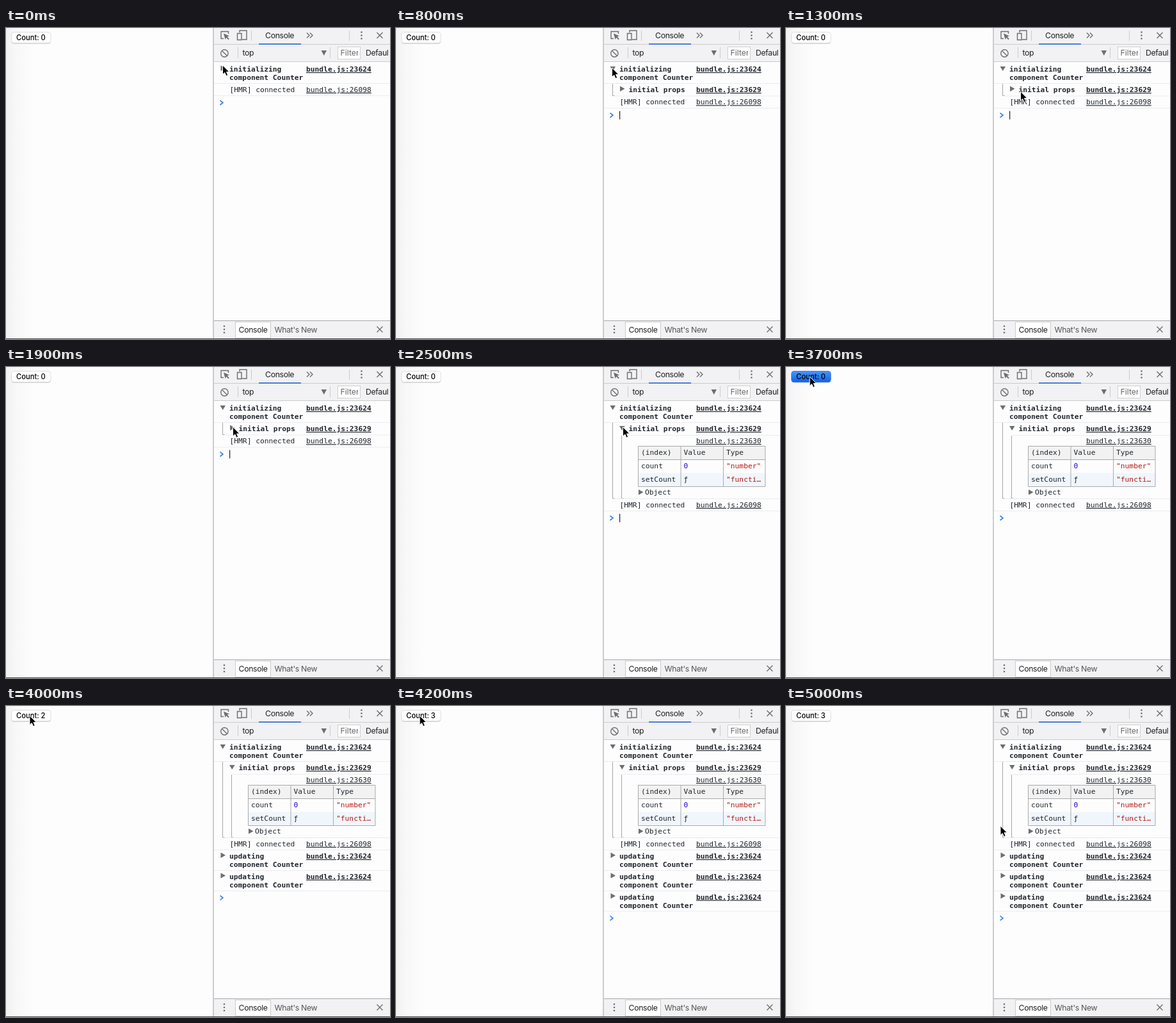
Recreate the animation shown at these times as an HTML page. Size 600 by 485 pixels, loop 5.1 s.

```html
<!DOCTYPE html>
<html lang="en">
<head>
<meta charset="utf-8">
<title>Console groups</title>
<style>
  html, body { margin: 0; width: 100%; height: 100%; overflow: hidden; background: #fdfdfe; }
  svg { display: block; width: 600px; height: 485px; }
  text { white-space: pre; }
  .ui { font: 12.3px Inter, "Liberation Sans", sans-serif; letter-spacing: -.35px; fill: #222; }
  .button { font: 500 11.2px Inter, "Liberation Sans", sans-serif; fill: #000; }
  .label { font: 14px Inter, "Liberation Sans", sans-serif; fill: #555; }
  .mono { font: 11.28px "DejaVu Sans Mono", monospace; fill: #1e252c; }
  .bold { font-weight: bold; fill: #20252b; }
  .link { text-decoration: underline; }
  .icon { fill: none; stroke: #6e6e6e; stroke-width: 1.4; }
</style>
</head>
<body>
<svg viewBox="0 0 600 485">
  <defs>
    <linearGradient id="edge">
      <stop offset="0" stop-color="#f1f1f2"/>
      <stop offset=".35" stop-color="#f8f8f9"/>
      <stop offset="1" stop-color="#fdfdfe"/>
    </linearGradient>
    <linearGradient id="pressed" x2="0" y2="1">
      <stop offset="0" stop-color="#4a94fa"/>
      <stop offset="1" stop-color="#0d62ee"/>
    </linearGradient>
    <clipPath id="filterClip"><path d="M519 29h31v20h-31z"/></clipPath>
    <clipPath id="levelClip"><path d="M560 29h37.500v20h-37.500z"/></clipPath>
  </defs>
  <rect width="600" height="485" fill="#fdfdfe"/>
  <rect width="45" height="485" fill="url(#edge)"/>
  <g id="chrome"></g>
  <g id="scene"></g>
  <g id="cursor">
    <path d="M0 0V14.500L3.300 11.500L5.600 16.700L8.200 15.600L6 10.500H10.400Z" fill="#000" stroke="#fff" stroke-width="1"/>
  </g>
</svg>
<script>
const LOOP = 5100, STEP = 100;
const $ = id => document.getElementById(id);

const text = (x, y, s, cls = 'mono', attrs = '') =>
  `<text x="${x}" y="${y}" class="${cls}" ${attrs}>${s}</text>`;
const rect = (x, y, w, h, fill, attrs = '') =>
  `<rect x="${x}" y="${y}" width="${w}" height="${h}" fill="${fill}" ${attrs}/>`;
const line = (d, color = '#ccc', width = 1) =>
  `<path d="${d}" fill="none" stroke="${color}" stroke-width="${width}"/>`;
const divider = (y, x = 325) => line(`M${x} ${y}H600`, '#ececee');
const link = (y, n, bold) => text(469, y, 'bundle.js:' + n, 'mono link' + (bold ? ' bold' : ''));
const closeIcon = y => `<path class="icon" d="M579.500 ${y - 4.5}l9 9m0-9l-9 9"/>`;
const dots = (x, y) => [-5, 0, 5].map(d =>
  `<circle cx="${x}" cy="${y + d}" r="1.300" fill="#6e6e6e"/>`).join('');
const triangle = (x, y, open) =>
  `<path d="M${x} ${y}${open ? 'h8.500l-4.250 7z' : 'v8.500l7.500-4.250z'}" fill="#6e6e6e"/>`;

function drawChrome() {
  return rect(324.5, 0, 275.5, 52, '#f2f1f3') + line('M325 25.500H600') + line('M325 52.500H600')
    + rect(324.5, 457, 275.5, 28, '#f2f1f3') + line('M325 456.500H600', '#a8a8a8')
    + line('M324 0V485', '#9c9c9c')
    + line('M383.500 4V20M536.500 4V20M362.500 30V47M506.500 30V47')
    + rect(395, 24, 66, 2, '#4a80d8')
    + '<path class="icon" d="M340 16.500H336V5.500H347.500V9"/>'
    + '<path d="M340 8.500L349 12.500L345.600 13.600L348.800 17L347.300 18.300L344.200 15L342.600 18Z" fill="#6e6e6e"/>'
    + '<path class="icon" d="M365 7V4H376V18H369M361.500 8.500H368V18.500H361.500Z"/>'
    + text(405, 15.5, 'Console', 'ui')
    + '<path class="icon" d="M470 7.500l4 4l-4 4M475 7.500l4 4l-4 4"/>'
    + dots(555.5, 11.5) + closeIcon(11.5)
    + '<path class="icon" d="M335.700 39.500a5.700 5.700 0 1 0 11.400 0a5.700 5.700 0 1 0-11.400 0M337.500 35.500l8 8"/>'
    + text(369.5, 43, 'top', 'ui')
    + '<path d="M492.500 35h8.500l-4.250 8z" fill="#6e6e6e"/>'
    + rect(518.5, 29.5, 35, 19, '#fff', 'stroke="#d0d0d0"')
    + text(522.5, 43, 'Filter', 'ui', 'style="fill:#666;letter-spacing:0" clip-path="url(#filterClip)"')
    + text(562, 43, 'Default', 'ui', 'clip-path="url(#levelClip)"')
    + dots(341, 470) + rect(358.5, 458.5, 55, 25, '#fff', 'stroke="#ccc"')
    + text(363.5, 474.5, 'Console', 'ui') + text(419.5, 474.5, "What's New", 'ui', 'style="fill:#555"')
    + closeIcon(470) + rect(0, 484, 600, 1, '#4b4e50');
}

function drawButton(count, pressed) {
  const y = 6.5, size = 'rx="4"';
  return rect(8.5, y + 1, 61.5, 17.2, '#d0d0d2', size)
    + rect(8.5, y, 61.5, 17, pressed ? 'url(#pressed)' : '#fff',
      `${size} stroke="${pressed ? '#2a6fe0' : '#d6d6d8'}" stroke-width=".8"`)
    + text(16, 19, 'Count: ' + count, 'button');
}

function drawTable() {
  const cells = [[137, '(index)', 'Value', 'Type'], [158, 'count', '0', '"number"'], [179, 'setCount', 'ƒ', '"functi…']];
  const style = (row, col) => !row || !col ? '' :
    col === 2 ? 'style="fill:#b8140f"' : row === 1 ? 'style="fill:#1c00cf"' : 'font-style="italic"';
  return rect(378.5, 123.5, 198.5, 21, '#f2f2f2') + rect(378.5, 165.5, 198.5, 21, '#f0f6fc')
    + line('M378.500 123.500H577V186.500H378.500ZM378.500 144.500H577M445 123.500V186.500M511.500 123.500V186.500', '#aaa')
    + cells.map(([y, ...row], r) => row.map((s, c) =>
      text([383, 449.5, 516][c], y, s, 'mono', style(r, c))).join('')).join('');
}

function drawGroup(y, title, open) {
  return triangle(open ? 334.5 : 335.5, y - (open ? 8 : 9.5), open)
    + text(349, y, title, 'mono bold') + text(349, y + 13.2, 'component Counter', 'mono bold')
    + link(y, 23624, true) + divider(y + 18.5);
}

function drawConsole({ groupOpen, propsOpen, count, caret }) {
  let out = drawGroup(68, 'initializing', groupOpen), y = 86.5;
  if (groupOpen) {
    out += triangle(propsOpen ? 349 : 350, propsOpen ? 92 : 90.5, propsOpen)
      + text(363.5, 100, 'initial props', 'mono bold') + link(100, 23629, true);
    y = propsOpen ? 205.5 : 106;
    out += line(`M338.500 87V${y - .5}h3`, '#a5a5a5');
    if (propsOpen) {
      out += divider(106.5, 354) + link(119, 23630) + drawTable()
        + triangle(379, 191) + text(389, 199, 'Object')
        + line('M352.500 107V205h3', '#a5a5a5');
    }
    out += divider(y, 342);
  }
  out += text(349.5, y + 13.3, '[HMR] connected') + link(y + 13.3, 26098) + divider(y + 19);
  y += 19.5;
  for (let i = 0; i < count; i++, y += 31.8) out += drawGroup(y + 13, 'updating', false);
  out += line(`M334.500 ${y + 7}l4.500 3.500l-4.500 3.500`, '#3b7fe0', 1.6);
  return caret ? out + rect(349, y + 4, 1.2, 13, '#222') : out;
}

function drawLabel(opacity) {
  return opacity ? `<g opacity="${opacity}">`
    + rect(-4, 31, 98, 28, '#efeff0', 'rx="5" stroke="#c6c6c8"')
    + text(13, 50, 'Zap Cabin', 'label') + '</g>' : '';
}

// Each key is [time, ...values].
const pointer = [
  [0, 338.5, 58], [600, 338.5, 58], [700, 337.5, 62], [1200, 337.5, 62], [1300, 366.5, 99],
  [1500, 366.5, 98], [1700, 354, 92], [1800, 353.5, 92], [1900, 354.5, 93.5], [2500, 354.5, 93.5],
  [2600, 250, 80], [2700, 95, 48], [2800, 38, 32], [3000, 36.5, 30], [3100, 36, 27], [3300, 36.5, 24],
  [3400, 36.5, 24], [3500, 37, 15], [4200, 37, 15], [4300, 60, 28], [4400, 165, 90],
  [4500, 290, 162], [4600, 335, 187], [LOOP, 335, 187]
];
const fade = [[0, 0], [2600, 0], [2800, .9], [3000, .8], [3100, .55], [3300, 0], [LOOP, 0]];

function sample(keys, t) {
  const i = keys.findIndex(k => k[0] > t), a = keys[i - 1], b = keys[i];
  const p = (t - a[0]) / (b[0] - a[0]);
  return a.slice(1).map((v, n) => v + (b[n + 1] - v) * p);
}
const during = (t, ...spans) => spans.some(([from, to]) => t >= from && t < to);

function render(t) {
  const state = {
    groupOpen: t >= 800,
    propsOpen: t >= 2100,
    count: [3800, 4000, 4200].filter(at => t >= at).length,
    caret: during(t, [800, 1400], [1800, 2600], [3100, 3600])
  };
  const pressed = during(t, [3600, 3800], [3900, 4000], [4100, 4200]);
  $('scene').innerHTML = drawButton(state.count, pressed)
    + drawLabel(sample(fade, t)[0]) + drawConsole(state);
  $('cursor').setAttribute('transform', `translate(${sample(pointer, t)})`);
}

let shown = -1;
function tick() {
  const t = Math.floor(performance.now() % LOOP / STEP) * STEP;
  if (t !== shown) render(shown = t);
  requestAnimationFrame(tick);
}
$('chrome').innerHTML = drawChrome();
tick();
</script>
</body>
</html>
```
